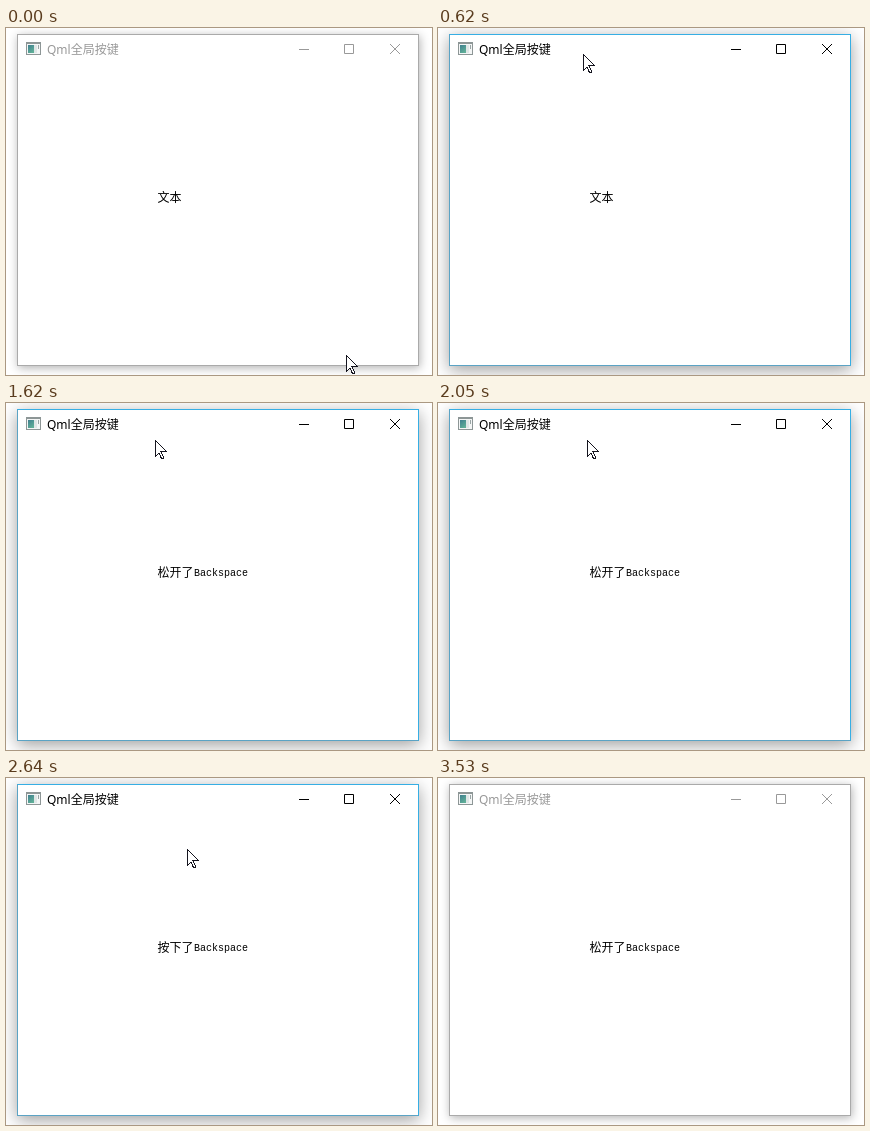
An HTML page for the animation above (3.65 s loop, 426 by 347 pixels).

```html
<!DOCTYPE html>
<html lang="zh-CN">
<head>
<meta charset="utf-8">
<title>Qml全局按键</title>
<style>
  html, body { margin: 0; width: 100%; height: 100%; overflow: hidden; background: #fff; }
  #stage { position: relative; width: 426px; height: 347px; overflow: hidden; background: #fff; }
  #window {
    position: absolute; left: 11px; top: 6px; width: 402px; height: 332px;
    box-sizing: border-box; background: #fff; border: 1px solid #aaa;
    box-shadow: 1px 2px 9px rgba(0, 0, 0, .3);
  }
  .active #window {
    border-color: #36aee4 #36aee4 #5ba3c4 #5ba3c4;
    box-shadow: 0 4px 16px rgba(0, 0, 0, .38);
  }
  svg { position: absolute; left: 0; top: 0; display: block; }
  #chrome { color: #999; }
  .active #chrome { color: #000; }
  text { font: 300 12px "Noto Sans CJK SC", "Noto Sans CJK JP", "Noto Sans CJK", sans-serif; }
  #title { font-weight: 400; font-family: "Noto Sans", "Noto Sans CJK SC", "Noto Sans CJK JP", "Noto Sans CJK", sans-serif; }
  #key { font: 10px "Liberation Mono", monospace; }
</style>
</head>
<body>
<div id="stage">
  <div id="window"></div>
  <svg width="426" height="347" viewBox="0 0 426 347">
    <defs>
      <linearGradient id="pane" x2="0.6" y2="1">
        <stop stop-color="#3f7f8f"/>
        <stop offset="1" stop-color="#5fae97"/>
      </linearGradient>
    </defs>
    <g id="icon">
      <rect x="20.5" y="14.5" width="14" height="12" fill="#f4f6f6" stroke="#8d9696"/>
      <path d="M20 15.5h15" stroke="#8d9696"/>
      <rect x="22" y="17" width="6" height="8" fill="url(#pane)"/>
      <rect x="28" y="17" width="3" height="8" fill="#dfe6e6"/>
      <path d="M32.5 17v4" stroke="#9aa5a5"/>
    </g>
    <g id="chrome" fill="none" stroke="currentColor">
      <text id="title" x="41" y="26" fill="currentColor" stroke="none">Qml全局按键</text>
      <path d="M293 21.5h10M338.5 16.5h9v9h-9zM384 16l10 10M394 16l-10 10"/>
    </g>
    <text id="label" x="151.5" y="174"></text>
    <text id="key" x="188" y="173"></text>
    <path id="cursor" d="M.5.5v16l3.5-3.5 2.5 5.5h1.5l.5-1-2.5-6h5.5z"
      fill="#fff" stroke="#15151f" shape-rendering="crispEdges"/>
  </svg>
</div>
<script>
  const LOOP = 3650;
  const TICK = 64; // the pointer is redrawn about this often while moving

  const glides = [
    { from: 0, to: 290, x: 151, y: 57 },
    { from: 290, to: 500, x: 147, y: 28 },
    { from: 500, to: 620, x: 145, y: 26 },
    { from: 1240, to: 1620, x: 149, y: 37 },
    { from: 1990, to: 2310, x: 178, y: 81 },
    { from: 2310, to: 2640, x: 181, y: 71 },
    { from: 2960, to: 3140, x: 385, y: 301 },
    { from: 3140, to: 3340, x: 430, y: 360 }
  ];

  const byId = id => document.getElementById(id);
  const stage = byId("stage"), cursor = byId("cursor"), label = byId("label"), key = byId("key");
  const within = (time, from, to) => time >= from && time < to;

  function pointerAt(time) {
    let x = 340, y = 327;
    for (const glide of glides) {
      if (time < glide.from) break;
      const duration = glide.to - glide.from;
      const steps = Math.round(duration / TICK);
      const progress = Math.min(1, Math.floor((time - glide.from) / duration * steps) / steps);
      x += (glide.x - x) * progress;
      y += (glide.y - y) * progress;
    }
    return [Math.round(x), Math.round(y)];
  }

  function draw(time) {
    const typed = time >= 1380;
    const pressed = within(time, 1380, 1540) || within(time, 2240, 2770);
    cursor.setAttribute("transform", `translate(${pointerAt(time)})`);
    stage.classList.toggle("active", within(time, 430, 3410));
    label.textContent = !typed ? "文本" : pressed ? "按下了" : "松开了";
    key.textContent = typed ? "Backspace" : "";
  }

  const start = performance.now();
  function tick() {
    draw((performance.now() - start) % LOOP);
    requestAnimationFrame(tick);
  }
  draw(0);
  requestAnimationFrame(tick);
</script>
</body>
</html>
```
